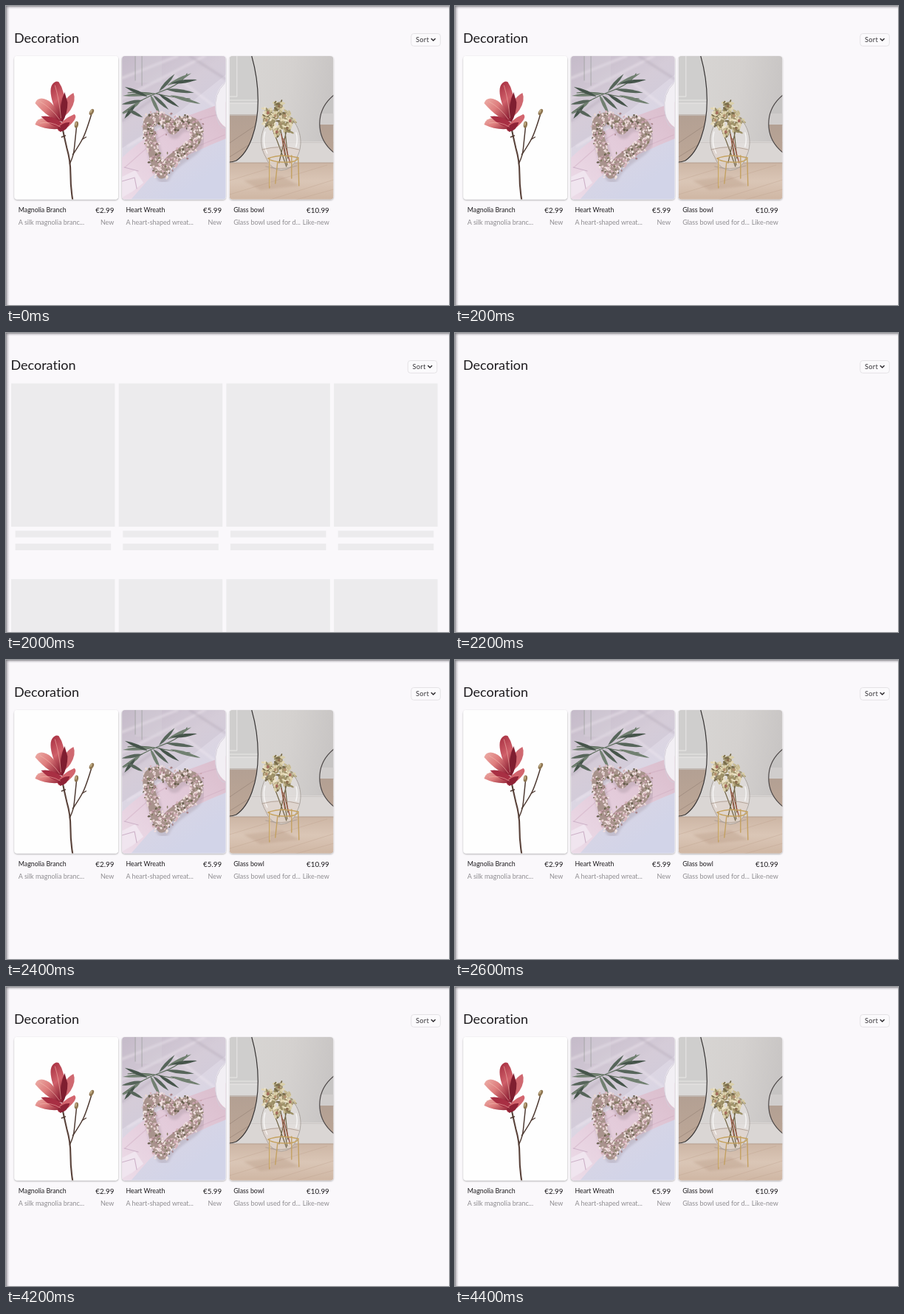
An HTML page for the animation above (4800 ms loop, 600 by 406 pixels).

```html
<!DOCTYPE html>
<html lang="en">
<head>
<meta charset="utf-8">
<style>
  html, body { margin: 0; width: 100%; height: 100%; overflow: hidden; background: #faf8fb; }
  svg { display: block; width: 600px; height: 406px; }
  text { font-family: Lato, "Open Sans", sans-serif; font-size: 9px; font-variant-ligatures: none; fill: #8f8d91; }
  .heading { font-size: 18px; fill: #1d1b1e; }
  .title { font-size: 8.8px; fill: #1d1b1e; }
  .price { font-size: 9.8px; fill: #1d1b1e; }
  .sort { font-size: 9.2px; fill: #343236; letter-spacing: .3px; }
  .end { text-anchor: end; }
  .line { fill: none; stroke-linecap: round; stroke-linejoin: round; }
</style>
</head>
<body>
<svg viewBox="0 0 600 406">
  <defs>
    <linearGradient id="edge">
      <stop offset="0" stop-color="#6a686e" stop-opacity=".75"/>
      <stop offset=".4" stop-color="#85838a" stop-opacity=".35"/>
      <stop offset="1" stop-color="#99979f" stop-opacity="0"/>
    </linearGradient>
    <linearGradient id="edgeTop" href="#edge" x2="0" y2="1"/>
    <linearGradient id="petal" x1=".2" y1="0" x2=".5" y2="1">
      <stop stop-color="#a93243"/><stop offset=".5" stop-color="#d0606a"/><stop offset="1" stop-color="#7d1c2c"/>
    </linearGradient>
    <linearGradient id="blush" x2="1" y2=".6">
      <stop stop-color="#eeb0a9"/><stop offset=".5" stop-color="#dd7c7c"/><stop offset="1" stop-color="#942539"/>
    </linearGradient>
    <linearGradient id="cloth" x2=".5" y2="1">
      <stop stop-color="#c9bfcd"/><stop offset=".4" stop-color="#ded6e1"/><stop offset="1" stop-color="#d2d4e8"/>
    </linearGradient>
    <linearGradient id="pink" x1="1" x2="0" y2="1">
      <stop stop-color="#dabdcc"/><stop offset=".6" stop-color="#e5cedd"/><stop offset="1" stop-color="#ecdce8"/>
    </linearGradient>
    <linearGradient id="wall" x2="1" y2=".2">
      <stop stop-color="#d9d7d5"/><stop offset=".6" stop-color="#d4d1cf"/><stop offset="1" stop-color="#c8c5c4"/>
    </linearGradient>
    <linearGradient id="floor" x2="0" y2="1">
      <stop stop-color="#cdb6a5"/><stop offset=".5" stop-color="#dac6b6"/><stop offset="1" stop-color="#cfb6a3"/>
    </linearGradient>
    <linearGradient id="mirrorFloor" x2="0" y2="1">
      <stop stop-color="#b3a093"/><stop offset="1" stop-color="#bda797"/>
    </linearGradient>
    <filter id="shadow" x="-10%" y="-10%" width="120%" height="120%">
      <feDropShadow dx="0" dy="1" stdDeviation="1.1" flood-color="#000" flood-opacity=".36"/>
    </filter>
    <filter id="soft"><feGaussianBlur stdDeviation="1.6"/></filter>
    <clipPath id="photo"><rect width="140.5" height="194.5" rx="4"/></clipPath>
    <clipPath id="leftMirror"><path d="M30 0Q38.5 30 38.5 60C38.5 98 27 130 9 142Q4 144 0 144V0Z"/></clipPath>
    <clipPath id="rightMirror"><circle cx="171" cy="92" r="49"/></clipPath>
  </defs>

  <g id="skeleton"></g>
  <g id="cards"></g>
  <g id="header">
    <text class="heading" x="11" y="50">Decoration</text>
    <rect x="548.8" y="37.5" width="39.5" height="16.8" rx="3.5" fill="#fbfafc" stroke="#e2e0e4" stroke-width=".9"/>
    <text class="sort" x="555" y="49">Sort</text>
    <path class="line" d="M576.2 44.5l2.5 2.5 2.5-2.5" stroke="#29272b" stroke-width="1.4"/>
  </g>
  <rect width="5" height="406" fill="url(#edge)"/>
  <rect width="600" height="4" fill="url(#edgeTop)"/>
</svg>
<script>
const LOOP = 4800, PITCH = 145.7, WIDTH = 140.5, TOP = 68;
const byId = id => document.getElementById(id);

let seed = 7;
const random = () => (seed = seed * 16807 % 2147483647) / 2147483647;
const spread = size => (random() - .5) * size;
const pick = list => list[Math.floor(random() * list.length)];

const shape = (d, fill, extra = '') => `<path d="${d}" fill="${fill}" ${extra}/>`;
const line = (d, stroke, width, extra = '') =>
  `<path class="line" d="${d}" stroke="${stroke}" stroke-width="${width}" ${extra}/>`;
const rect = (x, y, w, h, fill) => `<rect x="${x}" y="${y}" width="${w}" height="${h}" fill="${fill}"/>`;
const ellipse = (x, y, rx, ry, fill, turn = 0) =>
  `<ellipse rx="${rx.toFixed(1)}" ry="${ry.toFixed(1)}" fill="${fill}" transform="translate(${x.toFixed(1)} ${y.toFixed(1)}) rotate(${turn.toFixed(0)})"/>`;
const leaf = (x, y, length, width, turn, fill) =>
  shape(`M0 0Q${length * .4} ${-width} ${length} 0Q${length * .45} ${width} 0 0Z`, fill,
    `transform="translate(${x} ${y}) rotate(${turn})"`);

// Photos are drawn in the local space of a 140.5 x 194.5 card.
function magnolia() {
  const bud = (x, y, turn) => ellipse(x, y, 2.6, 4.6, '#8d7450', turn) + ellipse(x - .6, y - 1, 1.1, 2.8, '#c2ae84', turn);
  return rect(0, 0, 141, 195, '#fefefe')
    + line('M65 97C67 108 69 116 71 125Q76 142 76 160T79 196', '#59423a', 2.1)
    + line('M75 146Q80 136 81 126T84 97', '#4e3a32', 1.5)
    + line('M79 134Q89 119 93 111T104 80', '#4e3a32', 1.5)
    + line('M92 113L97 110M64 110L69 108', '#4e3a32', 1.4)
    + bud(84, 93, 8) + bud(104.5, 76, 28)
    + shape('M62 84Q64 58 80 50Q84 60 76 73Q69 83 62 84Z', '#cf6870')
    + shape('M54 70Q46 47 51 39Q55 33 60 35Q69 48 68 69L63 89Z', 'url(#petal)')
    + shape('M62 87Q61 64 68 49L72 63Q72 78 65 90Z', '#7f1e30')
    + shape('M28 64Q31 56 40 58Q54 61 65 89Q48 87 28 64Z', 'url(#blush)')
    + shape('M28 93Q30 83 45 84Q58 86 70 97Q49 103 28 93Z', 'url(#blush)')
    + shape('M36 82Q50 79 65 91L61 97Q49 95 36 82Z', '#a82f43')
    + shape('M58 99Q64 86 81 79Q86 82 78 91Q71 99 60 102Z', '#d3656e')
    + shape('M58 98Q66 89 75 90Q72 101 62 103Z', '#8f2236')
    + line('M55 40Q61 60 63 84M35 62Q51 71 61 86M35 91Q49 88 62 96', '#f3bbb1', .9, 'opacity=".65"');
}

function wreath(heart) {
  let art = rect(0, 0, 141, 195, 'url(#cloth)')
    + shape('M0 0H141V25L78 75L0 125Z', '#b9adbd', 'opacity=".25"')
    + line('M0 30L75 0M0 58L112 0M8 122L78 83M70 26L138 78', '#f1e9f1', 3, 'opacity=".5" filter="url(#soft)"')
    + line('M0 88L60 45M92 0L140 31', '#a99dac', 2.5, 'opacity=".4" filter="url(#soft)"')
    + shape('M141 62L84 83Q40 100 0 138V195H12L38 165Q80 136 141 112Z', 'url(#pink)')
    + line('M136 78Q82 90 48 112L4 151M139 107L92 127L42 157', '#c9a3b9', 1.3, 'opacity=".4"')
    + shape('M0 164L18 155L29 172L14 184L0 192Z', '#f0e5ef')
    + line('M0 170L17 165L20 180M3 151L22 156', '#cdb3c9', 1.2)
    + ellipse(151, 66, 25, 34, '#f2eff4') + line('M139 37Q124 51 127 75T140 98', '#d3ccd8', 1)
    + rect(18, 0, 36, 36, '#d8d7dc44') + line('M18 0V33M27 0V40', '#8f9690', 1, 'opacity=".6"');
  art += line('M1 77Q25 58 53 48T88 24M46 51Q67 56 92 58M44 51Q20 48 8 50', '#556754', 1.2);
  const leaves = [
    [50, 48, 32, -48], [61, 40, 37, -27], [66, 37, 36, -8], [59, 45, 39, 7], [65, 53, 43, 16],
    [49, 51, 34, 33], [42, 53, 29, 43], [43, 51, 42, 176], [35, 55, 34, 203], [28, 60, 29, 169],
    [25, 62, 30, 145], [18, 66, 24, 128], [7, 72, 24, 28], [38, 52, 32, 64]
  ];
  leaves.forEach(([x, y, length, turn], i) =>
    art += leaf(x, y, length, 4.6, turn, ['#56655a', '#718071', '#46554b'][i % 3]));
  art += line(heart, '#8b7d87', 19, 'opacity=".25" filter="url(#soft)" transform="translate(2 4)"')
    + line(heart, '#a8938c', 15);
  const track = document.createElementNS('http://www.w3.org/2000/svg', 'path');
  track.setAttribute('d', heart);
  const total = track.getTotalLength();
  const tones = ['#e5cfd0', '#d6b4bb', '#f1e5e2', '#c9a4ad', '#857c64', '#e9d8d4', '#a8858a', '#f0dfe0', '#69604f'];
  for (let i = 0; i < 480; i++) {
    const p = track.getPointAtLength(total * i / 480);
    art += ellipse(p.x + spread(18), p.y + spread(18), .8 + random() * 1.3, .8 + random(), pick(tones), random() * 180);
  }
  return art;
}

function bowl() {
  let art = rect(0, 0, 141, 195, 'url(#wall)')
    + rect(0, 116, 141, 32, '#dad6d4') + rect(0, 117, 141, 1, '#cbc7c5')
    + rect(0, 145, 141, 50, 'url(#floor)')
    + line('M0 145H141', '#b59f90', 1.2)
    + line('M0 169L75 146M0 188L132 148M55 195L141 168M90 195L141 181', '#b99d89', .7, 'opacity=".5"')
    + shape('M19 169L70 163L95 176L42 182Z', '#a9866e', 'opacity=".25" filter="url(#soft)"');
  art += `<g clip-path="url(#leftMirror)">${rect(0, 0, 40, 80, '#cfcecd')}${rect(0, 80, 40, 66, 'url(#mirrorFloor)')}
    ${rect(0, 64, 40, 17, '#d9d8d7')}${line('M0 60H40M0 64H40M10 0V55H0', '#e9e8e6', 1)}
    ${line('M0 80H40M0 118L40 91M0 137L40 112', '#9d897d', .8)}</g>`
    + line('M30 0Q38.5 30 38.5 60C38.5 98 27 130 9 142Q4 144 0 144', '#393636', 1.2);
  art += `<g clip-path="url(#rightMirror)">${rect(120, 40, 30, 54, '#c6c4c3')}${rect(120, 78, 30, 16, '#d0cdcc')}
    ${rect(120, 93, 30, 55, 'url(#mirrorFloor)')}</g>
    <circle cx="171" cy="92" r="49" fill="none" stroke="#4c4747" stroke-width="1.2"/>`;
  // Glass body, stems and blossoms, then the gold stand in front.
  art += shape('M56 84C43 96 38 119 49 137Q55 154 70 155Q86 154 91 138C101 119 96 96 82 83Z', '#ece8e5', 'opacity=".5"')
    + shape('M44 126Q70 119 94 126Q92 153 70 155Q49 153 44 126Z', '#ded0c6', 'opacity=".6"')
    + line('M53 87Q64 112 77 150M66 88Q73 114 78 148M79 93Q72 123 67 145M74 91Q77 118 79 139', '#6f6344', 1.2)
    + line('M73 112L82 145M70 106L75 135', '#9c5644', 1.2);
  [[52, 77], [62, 81], [56, 93], [67, 68], [75, 81], [82, 88], [71, 93], [50, 87], [78, 98], [64, 103]].forEach(([x, y]) => {
    art += ellipse(x, y, 5, 5.5, '#a3946d');
    for (let i = 0; i < 17; i++)
      art += ellipse(x + spread(13), y + spread(13), 2 + random() * 1.6, .9 + random() * .8,
        pick(['#d9cfaa', '#eee5c9', '#9c9067', '#c7ba91', '#e3d6b3', '#786c4c']), random() * 180);
    art += ellipse(x, y, 1.9, 2.3, pick(['#b2906e', '#a56d5d', '#8d7050']));
  });
  art += line('M56 84C43 96 38 119 49 137Q55 154 70 155Q86 154 91 138C101 119 96 96 82 83', '#a49e98', .9)
    + line('M48 103Q44 118 51 132M90 104Q93 113 90 123', '#fff', 1.4, 'opacity=".75"')
    + line('M44 127Q69 120 94 127M49 150Q70 156 91 149', '#a99a8e', .8)
    + line('M52 139Q70 132 93 138Q91 145 71 144Q56 143 52 139Z', '#c5a25f', 1.4)
    + line('M54 139V179M93 138L94 176M65 144L62 173M84 135V166', '#c3a061', 1.4)
    + line('M54.8 141V176', '#f1dba6', .5);
  return art;
}

const HEART = 'M69 99C64 85 47 80 38 88C32 95 39 114 43 130Q46 148 54 159C62 141 79 133 93 122C107 110 103 89 88 89Q75 89 69 99Z';
const products = [
  ['Magnolia Branch', '€2.99', 'A silk magnolia branc...', 'New', magnolia()],
  ['Heart Wreath', '€5.99', 'A heart-shaped wreat...', 'New', wreath(HEART)],
  ['Glass bowl', '€10.99', 'Glass bowl used for d...', 'Like-new', bowl()]
];

byId('cards').innerHTML = products.map(([title, price, about, state, art], i) => `
  <g transform="translate(${11.4 + i * PITCH} ${TOP})">
    <rect width="${WIDTH}" height="194.5" rx="4" fill="#fff" filter="url(#shadow)"/>
    <g clip-path="url(#photo)">${art}</g>
    <text class="title" x="5.4" y="211.5">${title}</text>
    <text class="price end" x="135" y="213">${price}</text>
    <text x="5.4" y="229">${about}</text>
    <text class="end" x="135" y="229">${state}</text>
  </g>`).join('');

byId('skeleton').innerHTML = [0, 1, 2, 3].map(i => {
  const x = 7 + i * PITCH, tone = '#ecebed';
  return rect(x, 68.5, WIDTH, 194.5, tone) + rect(x + 5.6, 268.5, 129.5, 9, tone)
    + rect(x + 5.6, 286, 129.5, 9, tone) + rect(x, 334.3, WIDTH, 72, tone);
}).join('');

const show = (id, visible) => byId(id).setAttribute('visibility', visible ? 'visible' : 'hidden');

function update(time) {
  const loading = time >= 2000 && time < 2200;
  // The page narrows while the placeholder rows overflow.
  byId('header').setAttribute('transform', `translate(${loading ? -4.5 : 0} 0)`);
  show('skeleton', loading);
  show('cards', time < 2000 || time >= 2400);
}

const start = performance.now();
function tick() {
  update((performance.now() - start) % LOOP);
  requestAnimationFrame(tick);
}
tick();
</script>
</body>
</html>
```
